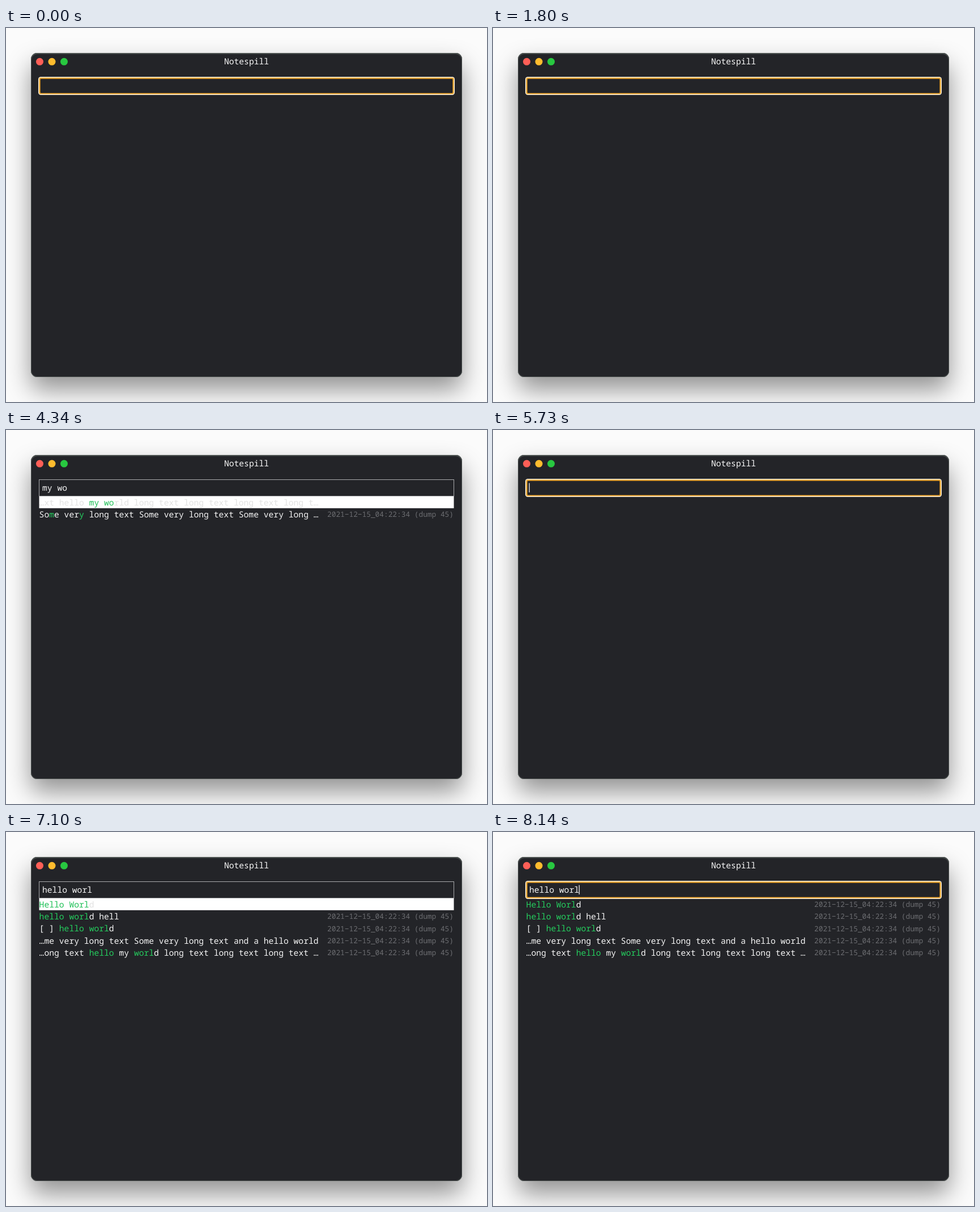
These frames come from a looping animation (849 by 659 pixels, 8470 ms). An HTML page:

```html
<!DOCTYPE html>
<html lang="en">
<head>
<meta charset="utf-8">
<title>Notespill</title>
<style>
html, body { margin: 0; width: 100%; height: 100%; overflow: hidden; background: #fbfbfb; }
.win {
  position: absolute; left: 44px; top: 44px; width: 761px; height: 571px;
  border-radius: 11px; background: #232428;
  box-shadow: 0 22px 44px rgba(0,0,0,.42), inset 0 0 0 1px #484d4c, inset 0 1px 0 1px #4b5250;
}
svg { position: absolute; left: 0; top: 0; display: block; }
text {
  font: 14.68px "Noto Sans Mono", "DejaVu Sans Mono", monospace;
  fill: #f6f6f6; white-space: pre; text-rendering: geometricPrecision;
}
.date { font-size: 12.82px; fill: #6c6d71; }
.hit { fill: #25cd5e; }
.sel text { fill: #e2e2e2; }
.sel .hit { fill: #1fc057; }
.sel .date { fill: none; }
</style>
</head>
<body>
<div class="win"></div>
<svg width="849" height="659" viewBox="0 0 849 659">
  <circle cx="59.5" cy="59.3" r="6.5" fill="#ff5f57"/>
  <circle cx="81" cy="59.3" r="6.5" fill="#febc2e"/>
  <circle cx="102.5" cy="59.3" r="6.5" fill="#28c840"/>
  <text x="424.5" y="64" text-anchor="middle">Notespill</text>
  <g id="rows"></g>
  <rect id="box" x="58.5" y="87.5" width="732" height="29" fill="none" stroke="#a9aaac"/>
  <g id="ring">
    <rect x="57" y="86" width="735" height="32" rx="4.5" fill="#fffaf0"/>
    <rect x="58.2" y="87.2" width="732.6" height="29.6" rx="3" fill="#eeac3c"/>
    <rect x="60" y="89" width="729" height="26" rx="2" fill="#a8731f"/>
    <rect x="61" y="90" width="727" height="24.5" rx="1" fill="#232428"/>
  </g>
  <text id="query" x="64" y="107.2"></text>
  <rect id="caret" y="93.5" width="1.2" height="16.5" fill="#fff"/>
</svg>
<script>
const LOOP = 8470, CELL = 8.808, PITCH = 21.42, MAX_ROWS = 21;
const STAMP = '2021−12−15_04:22:34 (dump 45)';
const CUT = '…me very long text Some very long text and a hello world';
const SOME = 'Some very long text Some very long text Some very long …';
const MY = '…xt hello my world long text long text long text long t…';
const always = [CUT, SOME, MY];

const greetings = [
  'hello', '− hello', '− hello', '## Hello', 'Hello World', 'hello world hell',
  '[ ] hello world', '− hello', '− hello', '[ ] China hello review −> W03',
  '− hello hello2 hello hello hello hello hello …', CUT,
  '…ong text hello my world long text long text long text …',
  '− Who will take over this role? Will get an invite for …'
];
const notes = [
  'Schedule a call with mum', '− team meeting at three', '[ ] mail the form', '## Home',
  '− remember the milk', '[ ] shipment email', 'What came up this month', '− time estimate',
  '[ ] pay my invoice', '## Memo', '− summary draft', 'Some more items', '[ ] merge main',
  '− empty inbox', 'random idea', '[ ] symptom list', '− metrics per month',
  'music for Monday', '[ ] commit tests'
];

// [time, query, caret shown, selected row or -1 for the input]
const steps = [[0, '', 0, -1], [80, '', 1, -1]];
const add = (t, q, caret = 1, sel = -1) => steps.push([t, q, caret, sel]);
const type = (word, times) => times.forEach((t, i) => add(t, word.slice(0, i + 1)));
const walk = (q, list) => list.forEach(([t, row]) => add(t, q, 0, row));

type('hello', [410, 570, 650, 810, 970]);
add(1470, 'hello', 0);
add(1800, '', 0);
add(1960, '');
add(2460, '', 0);
type('my wo', [2620, 2700, 2780, 2860, 2940]);
add(3440, 'my wo', 0);
walk('my wo', [[3600, 0], [3760, 1], [4340, 0]]);
add(4590, 'my wo');
add(5090, 'my wo', 0);
for (let n = 4; n >= 0; n--) add(5250 + (4 - n) * 80, 'my wo'.slice(0, n));
type('hello worl', [5810, 5890, 5970, 6130, 6290, 6370, 6450, 6530, 6610, 6690]);
walk('hello worl', [[7100, 0], [7260, 1], [7340, 2], [7500, 3], [7660, 2], [7820, 1], [7980, 0]]);
add(8140, 'hello worl');

// Indexes of matched characters: a whole substring first, else letters in order.
function match(line, query) {
  const low = line.toLowerCase(), at = low.indexOf(query);
  if (at >= 0) return [...query].map((_, i) => at + i);
  const found = [];
  let from = 0;
  for (const ch of query) {
    const i = low.indexOf(ch, from);
    if (i < 0) break;
    found.push(i);
    from = i + 1;
  }
  return found;
}

function search(input) {
  const query = input.trim();
  if (!query) return [];
  const pool = query[0] === 'm' ? [MY, SOME, ...notes] : [...greetings, ...notes];
  return pool
    .map(line => ({ line, hits: match(line, query) }))
    .filter(r => always.includes(r.line) || r.hits.length === query.length)
    .slice(0, MAX_ROWS);
}

const esc = s => s.replace(/&/g, '&amp;').replace(/</g, '&lt;').replace(/>/g, '&gt;');

function paint({ line, hits }) {
  const lit = new Set(line === CUT ? [] : hits);
  let out = '', run = '';
  for (let i = 0; i < line.length; i++) {
    run += line[i];
    if (i + 1 === line.length || lit.has(i + 1) !== lit.has(i)) {
      out += lit.has(i) ? `<tspan class="hit">${esc(run)}</tspan>` : esc(run);
      run = '';
    }
  }
  return out;
}

function rowSvg(row, i, sel) {
  const y = i * PITCH, on = i === sel;
  const bar = on ? `<rect x="58.5" y="${116.6 + y}" width="732" height="21.2" fill="#fff"/>` : '';
  return `<g class="${on ? 'sel' : ''}">${bar}<text x="58.6" y="${132.5 + y}">${paint(row)}</text>` +
    `<text class="date" x="567" y="${131.7 + y}">${STAMP}</text></g>`;
}

const el = id => document.getElementById(id);
const show = (id, on) => el(id).setAttribute('visibility', on ? 'visible' : 'hidden');
let shown = null;

function render(time) {
  const step = steps.findLast(s => s[0] <= time);
  if (step === shown) return;
  shown = step;
  const [, query, caret, sel] = step;
  el('rows').innerHTML = search(query).map((r, i) => rowSvg(r, i, sel)).join('');
  el('query').textContent = query;
  el('caret').setAttribute('x', 63.5 + query.length * CELL);
  show('caret', caret);
  show('ring', sel < 0);
  show('box', sel >= 0);
}

const start = performance.now();
function tick() {
  render((performance.now() - start) % LOOP);
  requestAnimationFrame(tick);
}
tick();
</script>
</body>
</html>
```
